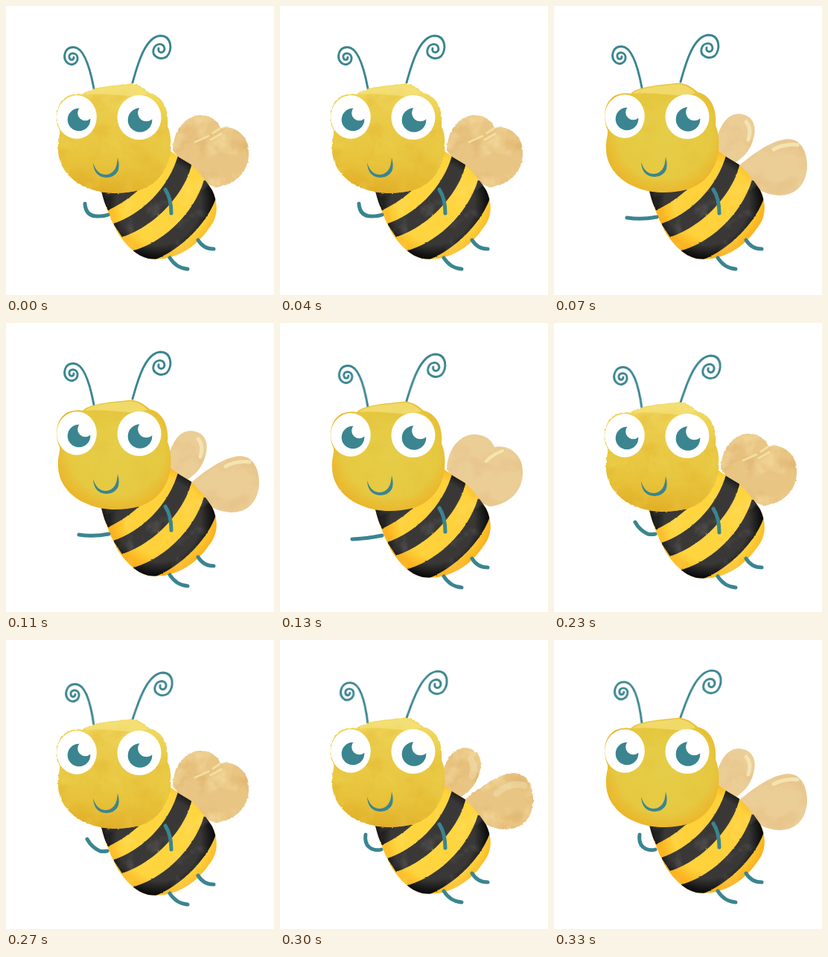
Write an HTML page that moves like this. It is 360 by 389 pixels and loops after 360 ms.

```html
<!DOCTYPE html>
<html lang="en">
<head>
<meta charset="utf-8">
<title>Flying bee</title>
<style>
  html, body { margin: 0; width: 100%; height: 100%; overflow: hidden; background: #fff; }
  svg { display: block; width: 100vw; height: 100vh; }
  .line { fill: none; stroke: #3a8590; stroke-linecap: round; stroke-linejoin: round; filter: url(#ink); }
  .limb { stroke-width: 5; }
  .feeler { stroke-width: 2.9; }
  .teal { fill: #3a8590; }
  .coarse .wing { fill: #e9c584; filter: url(#wingCoarse); }
  .fine .wing { fill: #ebcd96; filter: url(#wingFine); }
  .coarse .skin { fill: url(#faceCoarse); filter: url(#faceRough); }
  .fine .skin { fill: url(#faceFine); filter: url(#faceSmooth); }
  .coarse .torso { fill: url(#torsoCoarse); }
  .fine .torso { fill: url(#torsoFine); }
  .coarse .fineOnly, .fine .coarseOnly { display: none; }
</style>
</head>
<body>
<svg id="bee" class="coarse" viewBox="0 0 360 389" preserveAspectRatio="none">
  <defs>
    <g id="filters"></g>
    <linearGradient id="faceCoarse" x1=".55" y1="0" x2=".45" y2="1">
      <stop offset="0" stop-color="#f3dc66"/>
      <stop offset=".3" stop-color="#eacb49"/>
      <stop offset=".72" stop-color="#e8c43c"/>
      <stop offset="1" stop-color="#e3b02a"/>
    </linearGradient>
    <radialGradient id="faceFine" cx=".52" cy=".46" r=".56">
      <stop offset="0" stop-color="#e6cd48"/>
      <stop offset=".74" stop-color="#e6c941"/>
      <stop offset="1" stop-color="#ecb529"/>
    </radialGradient>
    <radialGradient id="torsoCoarse" gradientUnits="userSpaceOnUse" cx="212" cy="262" r="84">
      <stop offset=".68" stop-color="#ffd53f"/>
      <stop offset=".84" stop-color="#fbc02b"/>
    </radialGradient>
    <radialGradient id="torsoFine" gradientUnits="userSpaceOnUse" cx="212" cy="262" r="84">
      <stop offset=".62" stop-color="#ffd13a"/>
      <stop offset=".84" stop-color="#fbb31f"/>
    </radialGradient>
    <radialGradient id="coal" gradientUnits="userSpaceOnUse" cx="205" cy="265" r="78">
      <stop offset=".72" stop-color="#393837"/>
      <stop offset=".95" stop-color="#0c0c0c"/>
    </radialGradient>
    <path id="torsoShape" d="M128 249C133 270 142 290 151 307C162 323 175 336 191 340C225 345 255 325 272 300C286 284 285 265 277 248C271 238 262 226 248 213L233 204L200 180Z"/>
    <clipPath id="torsoClip"><use href="#torsoShape"/></clipPath>
  </defs>

  <g id="folded">
    <path class="wing" d="M224 194C225 170 238 149 259 147C275 146 285 155 288 164C306 160 326 173 326 197C327 224 306 242 281 244L250 230Z"/>
    <g fill="none" stroke="#f6e6a8" stroke-linecap="round" filter="url(#ink)">
      <path class="fineOnly" stroke-width="4" d="M277 183Q287 173 299 169"/>
      <path class="coarseOnly" stroke-width="3" opacity=".8" d="M254 183L272 175M278 171L287 165M275 180L289 172"/>
    </g>
  </g>
  <g id="spread">
    <path class="wing" d="M214 200C219 168 228 146 248 145C265 146 272 158 269 174C265 193 256 204 238 214Z"/>
    <path class="wing" d="M242 220C263 203 289 181 314 179C334 179 341 200 340 219C337 244 322 255 302 255C285 254 270 247 255 232Z"/>
    <g fill="none" stroke-linecap="round" filter="url(#ink)">
      <path class="fineOnly" stroke="#f3e4b0" stroke-width="5" d="M258 156Q266 165 261 180M295 193Q310 185 327 187"/>
      <path class="coarseOnly" stroke="#f0dcae" stroke-width="9" opacity=".55" d="M256 160Q263 172 258 183M291 207Q308 190 328 196"/>
    </g>
  </g>

  <g id="body">
    <g filter="url(#torsoPaint)">
      <use href="#torsoShape" class="torso"/>
      <g clip-path="url(#torsoClip)"><g fill="url(#coal)" filter="url(#ragged)">
        <path d="M120 240L190 235Q170 259 137 275Z"/>
        <path d="M144 293C180 281 219 247 232 198L250 210C244 247 203 296 156 311Z"/>
        <path d="M167 330C206 322 252 282 266 234L286 244C278 290 228 336 188 345Z"/>
      </g></g>
    </g>
    <path class="line limb" d="M214 247Q222 259 222 279"/>
  </g>
  <path id="arm" class="line limb"/>
  <g id="legs">
    <path class="line limb" d="M220 339Q229 353 244 354"/>
    <path class="line limb" d="M258 315Q265 327 279 327"/>
  </g>

  <path id="feelerL" class="line feeler" d="M118 111C113 84 105 56 91 55.500C78 55 76 70 82 76C88 82 97 77 96 69C95 62 84 62 85 69C86 74 91 73 91 69"/>
  <path id="feelerR" class="line feeler" d="M170 103C176 82 186 42 207 40C223 40 224 60 216 68C208 74 196 68 198 59C200 49 213 49 213 58C212 65 203 63 205 57"/>

  <g id="head">
    <path class="skin" d="M103 119C112 109 145 107 168 104.500C181 106 187 112 193 117C211 121 219 140 217 161C222 173 222 185 221 197C217 222 203 240 179 248C155 254 130 254 108 244C86 235 70 216 70 193C69 182 73 175 72 168C64 149 68 129 83 121Q94 117 103 119Z"/>
    <path fill="#f5e27c" opacity=".7" filter="url(#ink)" d="M106 119Q112 112 140 109L168 106Q181 108 190 118Q178 123 150 120Q125 117 106 119Z"/>
    <g fill="#fff" filter="url(#ink)">
      <ellipse cx="95" cy="149.500" rx="26.800" ry="29.300"/>
      <ellipse cx="179" cy="150" rx="29.500" ry="30"/>
    </g>
    <g filter="url(#ink)">
      <circle class="teal" cx="98" cy="153" r="15.300"/>
      <circle fill="#fff" cx="106.500" cy="144" r="10.300"/>
      <circle class="teal" cx="180" cy="153.500" r="16.300"/>
      <circle fill="#fff" cx="188.500" cy="144" r="11.300"/>
      <path class="teal" d="M117 211Q122 227 134 227Q149 226 150 204Q157 229 135 231Q118 230 117 211Z"/>
    </g>
  </g>
</svg>

<script>
const $ = id => document.getElementById(id);

// Paint filter: ragged edge plus optional blotches [r, g, b, gain, cutoff]
function paint(id, rough, freq, blotches = []) {
  const layers = blotches.map(([r, g, b, gain, cut], i) => `
    <feTurbulence type="fractalNoise" baseFrequency=".035" numOctaves="4" seed="${5 + i * 8}"/>
    <feColorMatrix values="0 0 0 0 ${r / 255} 0 0 0 0 ${g / 255} 0 0 0 0 ${b / 255} ${gain} 0 0 0 ${-gain * cut}"/>
    <feComposite in2="edge" operator="in" result="blot${i}"/>`).join('');
  const merge = blotches.map((_, i) => `<feMergeNode in="blot${i}"/>`).join('');
  return `<filter id="${id}" filterUnits="userSpaceOnUse" x="0" y="0" width="360" height="389" color-interpolation-filters="sRGB">
    <feTurbulence type="fractalNoise" baseFrequency="${freq}" numOctaves="2" seed="3" result="grain"/>
    <feDisplacementMap in="SourceGraphic" in2="grain" scale="${rough}" xChannelSelector="R" yChannelSelector="G" result="edge"/>
    ${layers}<feMerge><feMergeNode in="edge"/>${merge}</feMerge></filter>`;
}

$('filters').innerHTML = [
  paint('ink', 1.2, .3),
  paint('ragged', 2, .3),
  paint('torsoPaint', 1.5, .3, [[255, 255, 255, .4, .52]]),
  paint('faceRough', 3, .25, [[224, 172, 36, 1, .52], [240, 216, 88, 1.2, .52]]),
  paint('faceSmooth', 1.5, .25, [[224, 184, 50, .6, .52]]),
  paint('wingCoarse', 3, .25, [[222, 176, 104, 2, .5], [246, 222, 160, 2, .5]]),
  paint('wingFine', 1.5, .25, [[226, 184, 120, 1.2, .5]])
].join('');

// wing and look: 1 = spread / fine; the rest are vertical shifts, sway and arm path
const steps = [
  { ms: 70, spread: 0, fine: 0, wing: 0, head: 0, body: 0, legs: 0, feeler: 0, sway: 0, arm: 'M106 266Q107 283 123 283Q132 283 137 281' },
  { ms: 60, spread: 1, fine: 1, wing: 0, head: -1, body: 0, legs: 0, feeler: -1, sway: 0, arm: 'M98 285Q117 288 138 284' },
  { ms: 40, spread: 0, fine: 1, wing: 3, head: 1, body: 2, legs: 2, feeler: 2, sway: 1, arm: 'M97 291Q119 290 137 286' },
  { ms: 60, spread: 1, fine: 0, wing: 2, head: 2, body: 3, legs: 2, feeler: 3, sway: 1.5, arm: 'M100 278Q107 272 114 277Q125 286 137 286' },
  { ms: 70, spread: 0, fine: 0, wing: 2, head: 2, body: 3, legs: 2, feeler: 4, sway: 2.5, arm: 'M109 268Q115 279 126 284Q131 285 136 284' },
  { ms: 30, spread: 1, fine: 0, wing: 0, head: 0, body: 1, legs: -1, feeler: 2, sway: 3.5, arm: 'M115 262Q113 276 123 281Q130 284 136 282' },
  { ms: 30, spread: 1, fine: 1, wing: 1, head: 0, body: 0, legs: -1, feeler: 1, sway: 3.5, arm: 'M115 262Q113 276 123 281Q130 284 136 282' }
];
const total = steps.reduce((sum, s) => sum + s.ms, 0);

const move = (id, dy) => $(id).setAttribute('transform', `translate(0 ${dy})`);

// Lean a feeler sideways while its foot stays planted
function lean(id, footX, footY, s) {
  $(id).setAttribute('transform',
    `translate(${footX} ${footY + s.feeler}) skewX(${-s.sway * 1.1}) translate(${-footX} ${-footY})`);
}

function pose(s) {
  $('bee').setAttribute('class', s.fine ? 'fine' : 'coarse');
  $('folded').style.display = s.spread ? 'none' : '';
  $('spread').style.display = s.spread ? '' : 'none';
  move('folded', s.wing);
  move('spread', s.wing);
  move('body', s.body);
  move('legs', s.legs);
  move('head', s.head);
  $('arm').setAttribute('d', s.arm);
  lean('feelerL', 118, 111, s);
  lean('feelerR', 170, 103, s);
}

function stepAt(time) {
  let t = time % total;
  return steps.find(s => (t -= s.ms) < 0) || steps[0];
}

let shown;
const start = performance.now();
function tick() {
  const s = stepAt(Math.max(0, performance.now() - start));
  if (s !== shown) pose(shown = s);
  requestAnimationFrame(tick);
}
tick();
</script>
</body>
</html>
```
